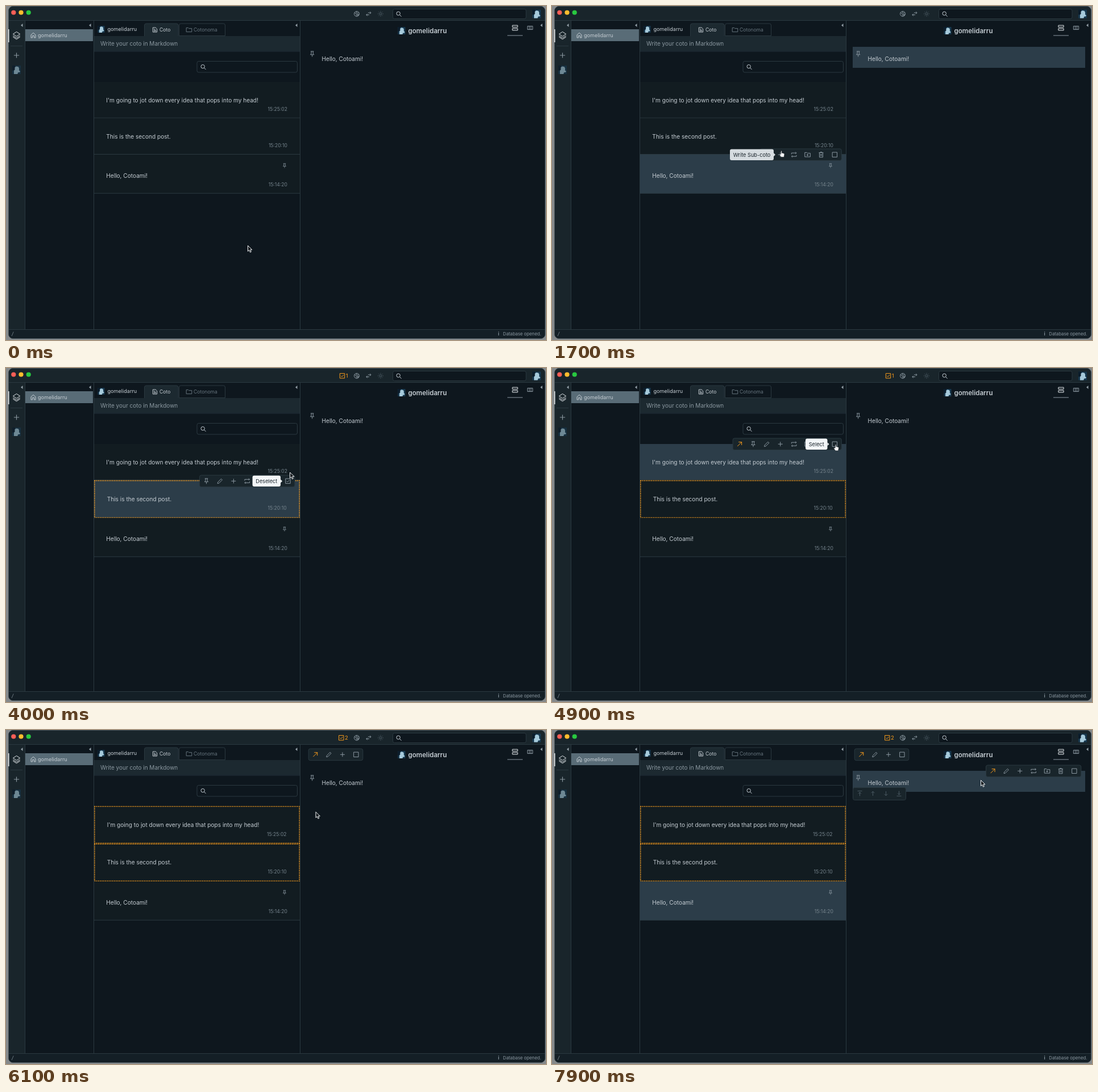
An HTML page for the animation above (8000 ms loop, 950x589 px).

```html
<!DOCTYPE html>
<html lang="en">
<head>
<meta charset="utf-8">
<title>Notes</title>
<style>
  html, body { margin: 0; width: 100%; height: 100%; overflow: hidden; background: #85898b; }
  svg { display: block; font-family: Inter, sans-serif; }
</style>
</head>
<body>
<svg width="950" height="589" viewBox="0 0 950 589">
  <g id="scene"></g>
  <g id="cursor">
    <path id="arrow" d="M0 0V10.2L2.4 8 4 11.8 5.8 11 4.2 7.4H7.4Z" fill="#10171c" stroke="#f4f6f7"/>
    <path id="hand" d="M-.8 6V1Q0-.4.9 1V4L4.6 5Q5.6 5.4 5.4 7L4.6 11.4H-.4L-3.2 7.4Q-3.2 5.6-1.6 6.6Z" fill="#f4f6f7" stroke="#10171c" stroke-width=".6"/>
  </g>
</svg>
<script>
const USER = 'gomelidarru';
const C = {
  bg: '#0e171e', bar: '#19252b', post: '#121c21', editor: '#1c2930', hover: '#2c3d49',
  line: '#2b3940', text: '#c4ccd2', dim: '#76848d', icon: '#8b98a1', orange: '#f79b1c', white: '#e6ebee'
};
const BOX = 'M-4.2-4.2h8.4v8.4h-8.4z';
const ICONS = {
  pin: 'M-2.7-4.5h5.4M-1.6-4.5v4l-1.6 1.8h6.4l-1.6-1.8v-4M0 1.3v3.7',
  edit: 'M-4.3 4.3l.5-2.4 5.9-5.9 1.9 1.9-5.9 5.9z',
  plus: 'M-4 0h8M0-4v8',
  repeat: 'M-4.3-.8v-2.2h8.3M2.6-4.7l1.7 1.7-1.7 1.7M4.3.8v2.2h-8.3M-2.6 1.3l-1.7 1.7 1.7 1.7',
  folder: 'M-4.8-3.6h3.4l1.2 1.2h5v6h-9.6z',
  promote: 'M-4.8-3.8h3.4l1.2 1.2h5v6.4h-9.6zM0-1.2v3.6M-1.8.6h3.6',
  trash: 'M-4-3.6h8M-1.3-3.6v-1h2.6v1M-3-3.6v8.1h6v-8.1M-1-1.4v3.8M1-1.4v3.8',
  box: BOX,
  checked: BOX + 'M-2.3 0l1.7 1.7 3.2-3.4',
  link: 'M-3.8 3.8l7.4-7.4M-1.8-3.6h5.4v5.4',
  top: 'M-4-4.4h8M0 4.4v-6.4M-2.5.3l2.5-2.5 2.5 2.5',
  up: 'M0 4v-7.6M-3-.8l3-3 3 3',
  down: 'M0-4v7.6M-3 .8l3 3 3-3',
  bottom: 'M-4 4.4h8M0-4.4v6.4M-2.5-.3l2.5 2.5 2.5-2.5',
  search: 'M-4-.8a3.2 3.2 0 1 0 6.4 0a3.2 3.2 0 1 0-6.4 0M1.6 1.6l3 3',
  layers: 'M0-6l6.2 4-6.2 4-6.2-4zM-6.2 1l6.2 4 6.2-4M-6.2 3.2l6.2 4 6.2-4',
  home: 'M-4-.6l4-3.6 4 3.6v5h-2.6v-3.6h-2.8v3.6h-2.6z',
  doc: 'M-3.6-4h4.8l2.4 2.4v5.6h-7.2zM-1.8-1.2h2M-1.8.6h3.6M-1.8 2.2h3.6',
  globe: 'M-4.5 0a4.5 4.5 0 1 0 9 0a4.5 4.5 0 1 0-9 0M-3.8-2l3 1.6v2l1 2.4M0-4l-.6 1.8 2.6 1 1.8-1.4M1 .6l2.6.6-1.8 2z',
  swap: 'M-1-1.8h5M2.2-3.8l2 2-2 2M1 1.8h-5M-2.2-.2l-2 2 2 2',
  sun: 'M-2 0a2 2 0 1 0 4 0a2 2 0 1 0-4 0M0-5v1.4M0 3.6v1.4M-5 0h1.4M3.6 0h1.4M-3.5-3.5l1 1M2.5 2.5l1 1M3.5-3.5l-1 1M-2.5 2.5l-1 1',
  rows: 'M-4.6-4.4h9.2v3.2h-9.2zM-4.6 1.2h9.2v3.2h-9.2z',
  columns: 'M-4.6-3h9.2v6h-9.2zM-1.5-3v6M1.5-3v6'
};

const rect = (x, y, w, h, fill, stroke = 'none', r = 0, extra = '') =>
  `<rect x="${x}" y="${y}" width="${w}" height="${h}" rx="${r}" fill="${fill}" stroke="${stroke}" ${extra}/>`;
const text = (x, y, size, fill, str, extra = '') =>
  `<text x="${x}" y="${y}" font-size="${size}" fill="${fill}" ${extra}>${str}</text>`;
const icon = (name, x, y, color = C.icon, scale = 1) =>
  `<path d="${ICONS[name]}" transform="translate(${x} ${y}) scale(${scale})" fill="none" stroke="${color}"/>`;
const hline = (x, y, w, color = C.line) => rect(x, y, w, 1, color);
const vline = (x, y, h, color = C.line) => rect(x, y, 1, h, color);
const fold = (x, y = 34) => `<path d="M${x + 1.5} ${y - 3}v6l-3.5-3z" fill="#939fa7"/>`;
const avatar = (x, y, size, opacity = 1) =>
  `<g transform="translate(${x} ${y}) scale(${size / 12})" opacity="${opacity}">` +
  rect(-6, -6, 12, 12, '#17384f') + rect(-6, -6, 4, 7, '#0b1c2b') +
  '<path d="M-3.6 6v-5l1.2-1v-3.4l2-1.4 3 .6 1 2v3l1.6 1.4-1 1.4h-2l-.8 2.4z" fill="#a6cadb"/></g>';

function toolbar(right, y, names) {
  const step = 23.9, width = names.length * step;
  return rect(right - width, y - 10.3, width, 20.6, C.bar, C.line, 3) + names.map((name, i) =>
    icon(name, right - width + step * (i + .5), y, name == 'link' ? C.orange : C.icon)).join('');
}

function tooltip(right, y, str, width, fill = '#f3f6f8') {
  return rect(right - width, y - 9.7, width, 19.4, fill, 'none', 3) +
    `<path d="M${right} ${y - 3}l3 3-3 3z" fill="${fill}"/>` +
    text(right - width / 2, y + 3.4, 9.2, '#1b252c', str, 'text-anchor="middle"');
}

function frameworkParts() {
  const lights = ['#ff5f57', '#febc2e', '#28c840']
    .map((c, i) => `<circle cx="${13.3 + 13.2 * i}" cy="11.5" r="4.1" fill="${c}"/>`).join('');
  return rect(4.5, .5, 944, 586, C.bg, '#46535a', 8) +
    `<path d="M5 25V9q0-8 8-8H940q8 0 8 8V25z" fill="${C.bar}"/>` + rect(5, 26, 28, 544, C.bar) +
    `<path d="M5 571H948v7q0 8-8 8H13q-8 0-8-8z" fill="#141f26"/>` +
    hline(5, 25, 943) + hline(5, 570, 943) + vline(33, 26, 544) + vline(154, 26, 544) + vline(517, 26, 544) +
    lights + icon('globe', 617, 13.8) + icon('swap', 638, 13.8) + icon('sun', 659, 13.8, '#4c5b64') +
    rect(680.5, 5.5, 234.5, 17, C.bg, C.line, 3) + icon('search', 691, 14, C.text) + avatar(933.5, 14, 15) +
    [28, 148, 511, 942].map(x => fold(x)).join('') +
    rect(4, 41, 1.5, 23, C.white) + icon('layers', 18.5, 51.5, C.white) + hline(8, 70, 21) +
    icon('plus', 18.5, 87, C.icon, 1.15) + avatar(18.5, 112.5, 15, .6) +
    rect(34, 41, 119, 21, '#596c77') + icon('home', 48, 51.5, C.text) + text(56, 54.8, 9.1, C.text, USER) +
    avatar(167.5, 41, 12) + text(178.5, 44.4, 9.1, C.text, USER) +
    rect(155, 53, 362, 26.5, C.editor) + hline(155, 79.5, 362, '#22303a') +
    `<path d="M243.5 53V34q0-3 3-3h53.500q3 0 3 3V53" fill="${C.editor}" stroke="${C.line}"/>` +
    `<path d="M304.500 52.500V34q0-3 3-3h75q3 0 3 3V52.500z" fill="none" stroke="${C.line}"/>` +
    icon('doc', 262, 42, C.text) + text(270, 45.3, 8.6, C.text, 'Coto') +
    icon('folder', 322, 42, '#65737c') + text(330, 45.3, 8.6, '#65737c', 'Cotonoma') +
    text(166, 69.500, 10, '#8b98a0', 'Write your coto in Markdown') +
    rect(336, 97.500, 176.500, 19.500, C.bg, C.line, 3) + icon('search', 347, 107.500, C.text) +
    avatar(696, 43.500, 13) + text(707.500, 47.800, 11.600, C.text, USER, 'font-weight="600"') +
    icon('rows', 895.500, 38.500, C.white) + hline(882, 51.500, 27, C.icon) + icon('columns', 922, 38.500) +
    text(10, 581, 8.600, C.icon, '/', 'font-style="italic"') + text(865.500, 580.500, 8.600, C.icon, 'i', 'font-weight="600"') +
    text(941.500, 580.500, 7.800, C.icon, 'Database opened.', 'text-anchor="end"');
}
const base = frameworkParts();

const posts = [
  { str: "I'm going to jot down every idea that pops into my head!", time: '15:25:02', height: 63.8 },
  { str: 'This is the second post.', time: '15:20:10', height: 64.2 },
  { str: 'Hello, Cotoami!', time: '15:14:20', height: 68.8, pinned: true }
];
const MORE = ['edit', 'plus', 'repeat', 'promote', 'trash'];

function scene({ selected, hover, tip, panel }) {
  let out = base, overlay = '', y = 134;
  posts.forEach((post, i) => {
    const picked = i < 2 && i >= 2 - selected;
    const shift = picked ? 1.4 : 0, height = post.height + (picked ? 2.5 : 0);
    const active = hover == i || (hover == 'pinned' && post.pinned);
    const baseline = y + (post.pinned ? 40.5 : 35.7) + shift;
    out += rect(155, y, 362, height, active ? C.hover : C.post);
    out += picked
      ? rect(155.8, y + .8, 360.4, height - 1.6, 'none', C.orange, 0, 'stroke-width="1.6" stroke-dasharray="1.6 1.5"')
      : hline(155, y + height - 1, 362);
    out += text(176.3 + shift, baseline, 10.1, C.text, post.str) +
      text(495 - shift, baseline + 15.5, 8.6, C.dim, post.time, 'text-anchor="end"');
    if (post.pinned) out += icon('pin', 490, y + 19.5, C.icon, .8);
    if (hover == i) {
      const others = selected - (picked ? 1 : 0);
      const tools = [...(others ? ['link'] : []), ...(post.pinned ? [] : ['pin']), ...MORE, picked ? 'checked' : 'box'];
      const right = 509.3 - shift, middle = y + .2 + shift;
      overlay += toolbar(right, middle, tools);
      if (tip == 'Write Sub-coto') overlay += tooltip(390, middle, tip, 77, '#d6dce0');
      else if (tip) overlay += tooltip(right - 24.8, middle, tip, tip == 'Select' ? 38.5 : 49.5);
    }
    y += height;
  });
  out += overlay;

  if (hover == 2 || hover == 'pinned') out += rect(529, 72, 409, 37, C.hover);
  out += icon('pin', 538.7, 84.5) + text(555.5, 97.2, 10.1, C.text, 'Hello, Cotoami!');
  if (selected) {
    const x = selected == 1 ? 591.5 : 589.8;
    out += icon('checked', x, 13.8, C.orange) + text(x + 6.2, 17.3, 9.6, C.orange, selected);
  }
  if (panel) out += toolbar(627.8, 43.3, ['link', 'edit', 'plus', 'box']);
  if (hover == 'pinned') {
    out += toolbar(930.8, 72.3, ['link', ...MORE, 'box']) + rect(529.5, 101.5, 93, 22, C.bar, C.line, 3) +
      ['top', 'up', 'down', 'bottom'].map((name, i) => icon(name, 541.5 + 23 * i, 112, '#4b5a63')).join('');
  }
  return out;
}

// Each entry holds from its start time until the next one.
const at = (steps, t) => steps.filter(([start]) => start <= t).pop()[1];
const HOVER = [[0, null], [1100, 2], [1800, 1], [4100, 0], [6000, null], [7300, 'pinned']];
const TIPS = [[0, ''], [1600, 'Write Sub-coto'], [1800, ''], [3000, 'Select'], [3500, 'Deselect'],
  [4100, ''], [4700, 'Select'], [5200, 'Deselect'], [6000, '']];
const HAND = [[0, 0], [1600, 1], [1800, 0], [3000, 1], [4000, 0], [4700, 1], [5900, 0]];
const PATH = [[0, 425.5, 422.5], [900, 416, 357], [1300, 405, 285], [1700, 403.5, 255], [1800, 408, 243],
  [2700, 477.5, 217.5], [3200, 499, 198], [3800, 499, 198], [4000, 499.5, 184], [4300, 503, 160],
  [4900, 499, 134.5], [5800, 499, 134.5], [6000, 522, 140], [6100, 545, 144.5], [6700, 640, 188],
  [7100, 700, 130], [7400, 717, 99], [7500, 717, 99], [7900, 754.5, 88.5], [8000, 754.5, 88.5]];

function cursorAt(t) {
  const i = PATH.findIndex(p => p[0] > t);
  const [t0, x0, y0] = PATH[i - 1], [t1, x1, y1] = PATH[i];
  const k = (t - t0) / (t1 - t0);
  return [x0 + (x1 - x0) * k, y0 + (y1 - y0) * k];
}

const $ = id => document.getElementById(id);
let shown = '';
function draw() {
  const t = Math.floor(performance.now() % 8000 / 100) * 100;
  const state = {
    selected: t < 3500 ? 0 : t < 5200 ? 1 : 2,
    hover: at(HOVER, t), tip: at(TIPS, t), panel: t >= 6000
  };
  const key = JSON.stringify(state);
  if (key != shown) {
    $('scene').innerHTML = scene(state);
    shown = key;
  }
  const hand = at(HAND, t);
  $('hand').style.display = hand ? '' : 'none';
  $('arrow').style.display = hand ? 'none' : '';
  $('cursor').setAttribute('transform', `translate(${cursorAt(t)})`);
  requestAnimationFrame(draw);
}
draw();
</script>
</body>
</html>
```
